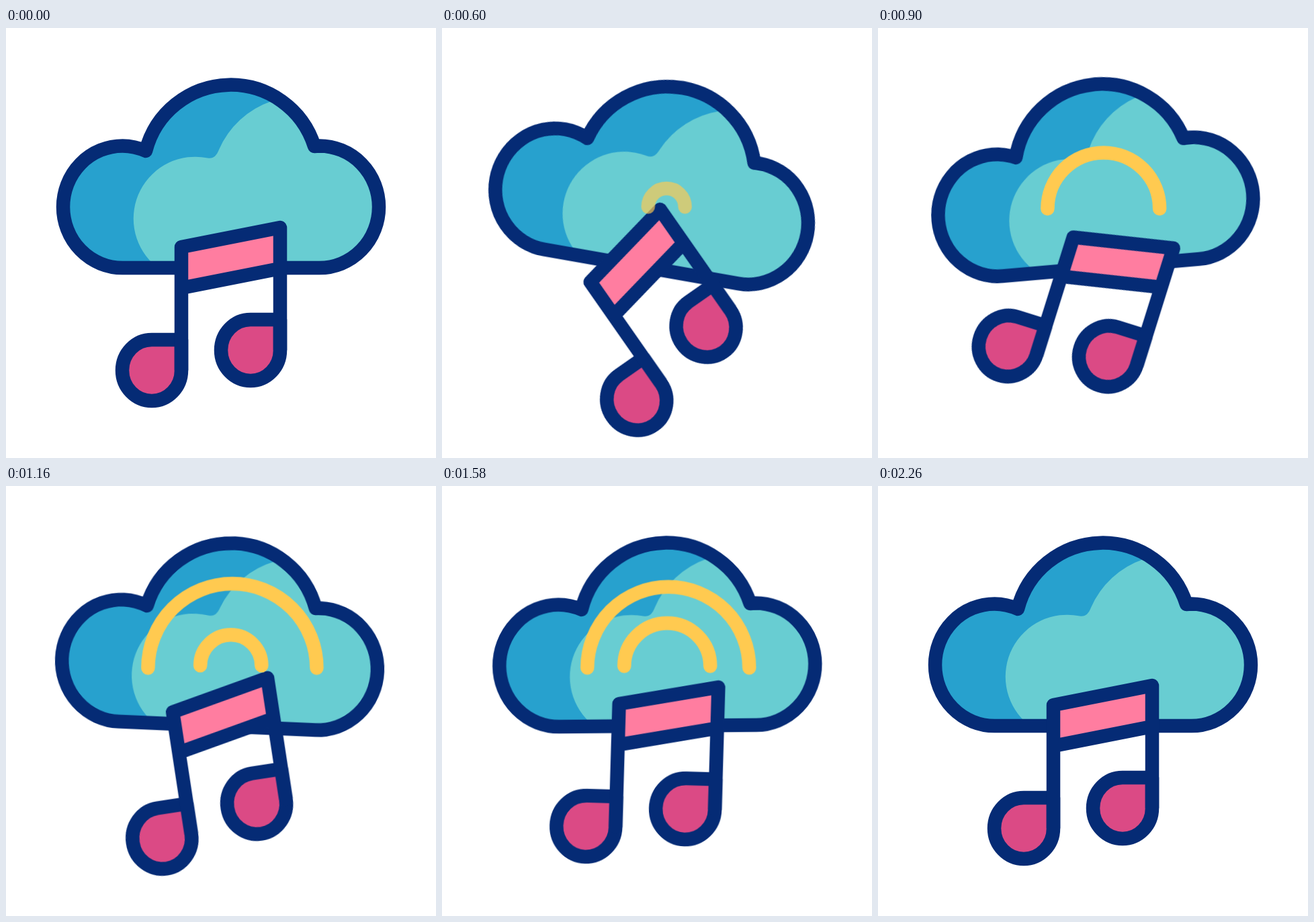
An HTML page without scripts for the animation above (2.4 s loop, 640 by 640 pixels).

```html
<!DOCTYPE html>
<html lang="en">
<head>
<meta charset="utf-8">
<title>Cloud music</title>
<style>
  html, body { margin: 0; width: 100%; height: 100%; overflow: hidden; background: #fff; }
  svg { display: block; width: 100%; height: 100%; }

  .line { fill: none; stroke: #052b75; stroke-width: 20.5; stroke-linecap: round; stroke-linejoin: round; }
  .head { fill: #db4a85; }

  .cloud, .note, .wave {
    animation: 2400ms cubic-bezier(.333, 0, .667, 1) infinite;
  }
  .cloud { --tilt: 10deg; transform-origin: 320px 221px; animation-name: swing; }
  .note { --tilt: -35deg; transform-origin: 323.5px 416px; animation-name: swing; }

  .wave {
    fill: none; stroke: #ffca50; stroke-width: 20.5; stroke-linecap: round;
    vector-effect: non-scaling-stroke; transform-origin: 0 0;
  }
  .outer { animation-name: outer; }
  .inner { animation-name: inner; }

  @keyframes swing {
    0%, 70.4%, 100% { transform: rotate(0deg); }
    24.8% { transform: rotate(var(--tilt)); }
    37.1% { transform: rotate(calc(var(--tilt) * -.5)); }
    48.75% { transform: rotate(calc(var(--tilt) * .25)); }
    59.6% { transform: rotate(calc(var(--tilt) * -.125)); }
  }
  @keyframes outer {
    0%, 21.67% { transform: scale(.235); opacity: 0; }
    27.1%, 80.5% { opacity: 1; }
    50.4% { transform: scale(1.27); }
    65%, 77.5% { transform: scale(1.205); }
    94.17%, 100% { transform: scale(1.52); opacity: 0; }
  }
  @keyframes inner {
    0%, 37.5% { transform: scale(.24); opacity: 0; }
    42.5%, 67% { opacity: 1; }
    59.2% { transform: scale(.67); }
    65.8% { transform: scale(.64); }
    79.2%, 100% { transform: scale(.8); opacity: 0; }
  }
</style>
</head>
<body>
<svg viewBox="0 0 640 640">
  <defs>
    <path id="outline" d="M173.5 357H466.5A88.5 90.75 0 0 0 466.5 175.5L459 176A130.5 130.5 0 0 0 208 183A88.5 90.75 0 0 0 173.5 175.5A88.5 90.75 0 0 0 173.5 357Z"/>
    <clipPath id="inside"><use href="#outline"/></clipPath>
    <path id="head" d="M261 464H217a44 45.5 0 1 0 44 45.5Z"/>
    <path id="arc" d="M-97.2 4.7A100 100 0 0 1 102.8 4.7"/>
  </defs>

  <g class="cloud">
    <use href="#outline" fill="#27a1ce"/>
    <path clip-path="url(#inside)" fill="#68cdd2"
      d="M218 350A92 92 0 0 1 300 193.5C308 195 313 191 317 181A131 131 0 0 1 395 109L600 0V400H218Z"/>
    <use href="#outline" class="line"/>
  </g>

  <g class="note">
    <path fill="#ff7da0" d="M261 326L408 297V358L261 387Z"/>
    <use href="#head" class="line head"/>
    <use href="#head" class="line head" x="147" y="-30"/>
    <path class="line" d="M261 509V326L408 297V479M261 387L408 358"/>
  </g>

  <g transform="translate(333.4 265)">
    <path class="wave outer" d="M-97.2 4.7A100 100 0 0 1 102.8 4.7"/>
    <path class="wave inner" d="M-97.2 4.7A100 100 0 0 1 102.8 4.7"/>
  </g>
</svg>
</body>
</html>
```
